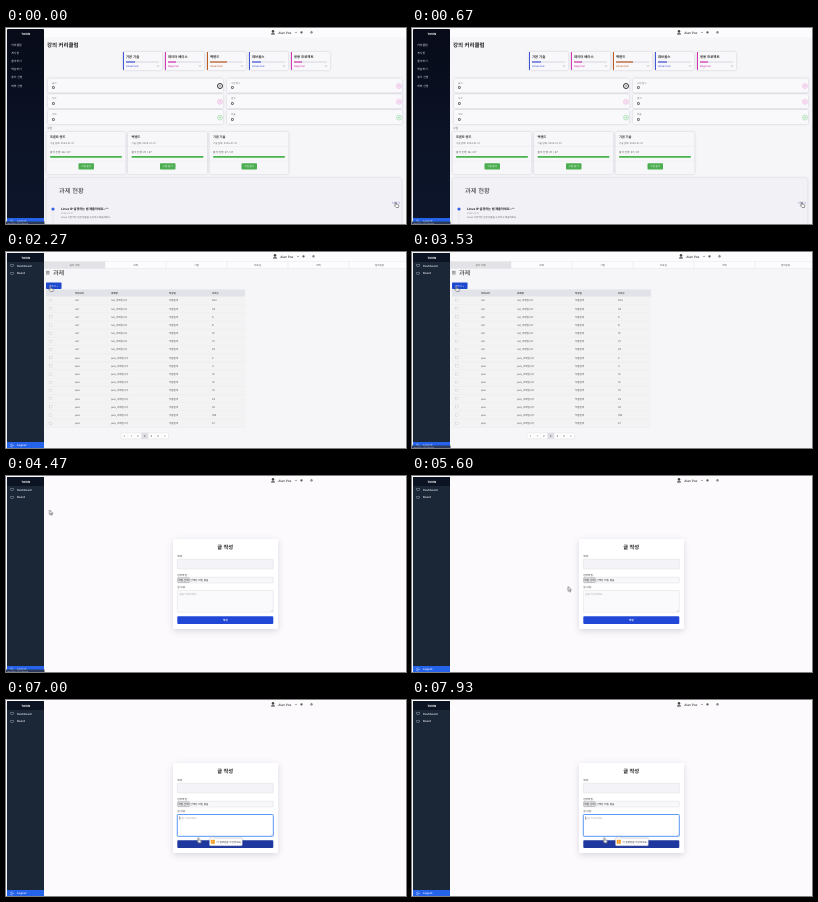
An HTML page for the animation above (8 s loop, 400 px wide and 196 px high).

```html
<!DOCTYPE html>
<html lang="ko">
<head>
<meta charset="utf-8">
<title>Course dashboard</title>
<style>
html, body { margin: 0; width: 100%; height: 100%; overflow: hidden; background: #fbfafc; }
svg { display: block; width: 100vw; height: 100vh; }
text { font-family: Inter, "Noto Sans CJK KR", "Noto Sans CJK", sans-serif; text-rendering: geometricPrecision; }
.card { filter: drop-shadow(0 .5px .8px rgba(30, 30, 60, .2)); }
.form { filter: drop-shadow(0 2px 3px rgba(40, 40, 80, .16)); }

.cut { animation: 8s step-end infinite; }
#home { animation-name: home; }
#board { animation-name: board; }
#write { animation-name: write; }
#dark { animation-name: home; }
#slate { animation-name: slate; }
@keyframes home { 0% { opacity: 1 } 11.625%, 100% { opacity: 0 } }
@keyframes slate { 0% { opacity: 0 } 11.625%, 100% { opacity: 1 } }
@keyframes board { 0% { opacity: 0 } 11.625% { opacity: 1 } 55%, 100% { opacity: 0 } }
@keyframes write { 0% { opacity: 0 } 55%, 100% { opacity: 1 } }

#status { animation: status 8s linear infinite; }
@keyframes status {
  0%, 11.6% { opacity: 1 } 11.625%, 33.3% { opacity: 0 }
  33.375%, 59.1% { opacity: 1 } 62.5%, 100% { opacity: 0 }
}
#add { animation: add 8s linear infinite; }
@keyframes add { 0%, 26.5% { fill: #2563eb } 27.5%, 100% { fill: #1d49cf } }
#send { animation: send 8s linear infinite; }
@keyframes send { 0%, 75.8% { fill: #2047d6 } 77.5%, 81.6% { fill: #1d41cc } 83%, 100% { fill: #1f389f } }
#focus { animation-name: focus; }
@keyframes focus { 0% { opacity: 0 } 81.625%, 100% { opacity: 1 } }
#caret { animation-name: caret; }
@keyframes caret {
  0% { opacity: 0 } 81.625% { opacity: 1 } 87.875% { opacity: 0 } 94.125%, 100% { opacity: 1 }
}
#tip { animation: tip 8s linear infinite; }
@keyframes tip { 0%, 81.625% { opacity: 0 } 83.5%, 100% { opacity: 1 } }

#pointer { animation: move 8s ease-in-out infinite; }
@keyframes move {
  0%, 10.9% { transform: translate(389px, 174px) }
  14%, 17% { transform: translate(271px, 151px) }
  21.6% { transform: translate(158px, 88px) }
  27.5%, 65.875% { transform: translate(43.5px, 34px) }
  71.625%, 75% { transform: translate(178px, 125.5px) }
  77.5%, 81.6% { transform: translate(191.5px, 139.5px) }
  83%, 100% { transform: translate(191.5px, 137.5px) }
}
#arrow { animation-name: arrow; }
#hand { animation-name: hand; }
@keyframes arrow {
  0% { opacity: 0 } 11.625% { opacity: 1 } 27.5% { opacity: 0 } 55% { opacity: 1 } 81.625%, 100% { opacity: 0 }
}
@keyframes hand {
  0% { opacity: 1 } 11.625% { opacity: 0 } 27.5% { opacity: 1 } 55% { opacity: 0 } 81.625%, 100% { opacity: 1 }
}
</style>
</head>
<body>
<svg id="stage" viewBox="0 0 400 196" preserveAspectRatio="none"></svg>
<script>
const rect = (x, y, w, h, fill, more = '') =>
  `<rect x="${x}" y="${y}" width="${w}" height="${h}" fill="${fill}" ${more}/>`;
// y is the vertical middle of the line
const text = (x, y, size, str, fill = '#333', more = '') =>
  `<text x="${x}" y="${y + size * .36}" font-size="${size}" fill="${fill}" ${more}>${str}</text>`;
const path = (d, stroke, width = .5, fill = 'none') =>
  `<path d="${d}" stroke="${stroke}" stroke-width="${width}" fill="${fill}"/>`;
const dot = (x, y, r, fill, more = '') => `<circle cx="${x}" cy="${y}" r="${r}" fill="${fill}" ${more}/>`;
const group = (id, body, cls = 'cut') => `<g id="${id}" class="${cls}">${body}</g>`;
const each = (list, fn) => list.map(fn).join('');
const bold = 'font-weight="700"', semi = 'font-weight="500"', mid = 'text-anchor="middle"';

function header(dx) {
  const x = 267 + dx;
  return dot(x, 3.2, 1.2, '#444') + path(`M${x - 1.7} 6.6q0-2 1.7-2t1.7 2z`, '#555', .3, '#777')
    + text(x + 5.3, 4.4, 3.1, 'Alan Poe', '#333', semi)
    + path(`M${x + 22} 3.9l1 1l1-1`, '#444')
    + dot(x + 28.5, 4.4, 1.1, '#555') + dot(x + 38.5, 4.4, 1.1, '#555') + dot(x + 38.5, 4.4, .4, '#fff');
}

function sidebar() {
  const brand = text(19.7, 5.8, 2.9, 'TOVIN', '#fff', bold + mid.padStart(22));
  const menu = ['커리큘럼', '게시판', '출석하기', '학습하기', '휴가 신청', '외박 신청'];
  const dark = rect(1, 1, 37, 195, 'url(#night)', 'rx="1"') + brand
    + each(menu, (s, i) => text(5.3, 16.5 + 8.2 * i, 2.8, s, '#e8eaf0', semi));
  const slate = rect(1, 1, 37, 195, '#1b2637', 'rx="1"') + rect(1, 1, 37, 9, '#0c1322') + brand
    + each(['Dashboard', 'Board'], (s, i) => rect(4.8, 12.5 + 7.7 * i, 2.4, 2, 'none', 'stroke="#aab4c4" stroke-width=".4"')
      + text(11, 13.6 + 7.7 * i, 2.8, s, '#eef1f6', semi));
  return group('dark', dark) + group('slate', slate)
    + rect(1, 190, 37, 6, '#2563eb') + path('M6.5 192h-1.6v3h1.6M6 193.5h2', '#fff', .4)
    + text(11, 193.4, 2.8, 'Logout', '#fff', semi)
    + group('status', rect(0, 193.5, 38.5, 2.5, '#2c3a5c') + text(1.5, 194.9, 2, 'localhost:3000/board', '#9fadca'), '');
}

function home() {
  const blue = '#4058d6', pink = '#d436b4', rust = '#bd5c22';
  const skills = [['기본 기술', blue, 9], ['데이터 베이스', pink, 8], ['백엔드', rust, 17], ['데브옵스', blue, 9], ['응용 프로젝트', pink, 8]];
  const levels = { [blue]: 'Advanced', [pink]: 'Beginner', [rust]: 'Advanced' };
  const stats = [['출석', '수업 일수'], ['지각', '결석'], ['조퇴', '외출']];
  const courses = [['프론트 엔드', '26 / 27'], ['백엔드', '27 / 27'], ['기본 기술', '27 / 27']];

  const skill = ([name, tone, w], i) => {
    const x = 117 + 42 * i;
    return `<g class="card">${rect(x, 24, 39, 18, '#f8f7fa', 'rx="1"')}</g>` + rect(x, 24, 1, 18, tone)
      + text(x + 3, 28.3, 3.4, name, '#333', bold)
      + rect(x + 3, 33.4, 33, 1.2, '#dfdee5') + rect(x + 3, 33.4, w, 1.2, tone)
      + text(x + 3, 38, 2.6, levels[tone], tone) + path(`M${x + 34} 37.5l1 1l1-1`, '#555', .4);
  };
  const stat = (name, x, y, ring, fill) =>
    `<g class="card">${rect(x, y, 175, 14, '#f9f8fb', 'rx="1"')}</g>`
    + text(x + 4, y + 4.3, 2.4, name, '#777') + text(x + 4, y + 9.3, 4.2, '0', '#222', bold)
    + dot(x + 172, y + 7.5, 2.5, fill, `stroke="${ring}" stroke-width="${ring === '#333' ? 1 : .4}"`)
    + path(`M${x + 171} ${y + 7.5}h2`, ring, .6);
  const course = ([name, done], i) => {
    const x = 40.5 + 81.5 * i;
    return `<g class="card">${rect(x, 104, 79, 42, '#f7f6f8', 'rx="1"')}</g>`
      + text(x + 3.5, 108.8, 3.2, name, '#333', bold)
      + text(x + 3.5, 114.7, 2.4, '기술 날짜: 2024-01-01', '#666')
      + path(`M${x} 118.5h79M${x} 133h79`, '#e4e3e8', .4)
      + text(x + 3.5, 123.8, 2.6, '출석 진행: ' + done, '#555')
      + rect(x + 3.5, 128, 72, 1.7, '#45b54c', 'rx=".8"')
      + rect(x + 32, 135.3, 15.5, 6.2, '#4cae50', 'rx=".8"')
      + text(x + 39.7, 138.4, 2.5, '수업 듣기', '#fff', mid);
  };

  return rect(0, 0, 400, 196, '#f6f5f8') + rect(38, 0, 362, 9.5, '#fcfbfd') + header(0)
    + text(41, 17, 5.5, '강의 커리큘럼', '#222', bold)
    + each(skills, skill)
    + each(stats, ([a, b], i) => {
      const y = 50.5 + 15.8 * i, tone = i === 2 ? ['#79c98b', '#e6f5e8'] : ['#e29ad4', '#f9e7f5'];
      return stat(a, 42, y, ...(i ? tone : ['#333', '#f6f6f6'])) + stat(b, 221, y, ...tone);
    })
    + text(41, 100, 2.8, '수업', '#666')
    + each(courses, course)
    + `<g class="card">${rect(40.5, 150, 355, 50, '#f2f1f6', 'rx="2"')}</g>`
    + text(53, 163, 6.3, '과제 현황', '#333', semi)
    + text(386, 175, 2.8, '더보기', '#6a62c8')
    + path('M47 181V196', '#d5d7e4', .4) + dot(47, 181, 1.6, '#3a5fe0')
    + text(55, 181, 3.1, 'Linux IP 설정하는 법 제출하세요~^^', '#222', bold)
    + text(55, 185.3, 2.2, '2024-01-17', '#888')
    + text(55, 189.6, 2.4, 'Linux 기본적인 설정 법들을 숙지하고 제출하세요.', '#666');
}

function board() {
  const tabs = ['공지 사항', '과제', '시험', '자료실', '회의', '질의응답'];
  const views = [554, 33, 5, 8, 12, 31, 22, 2, 4, 13, 13, 37, 23, 30, 198, 57];
  const row = (n, i) => {
    const y = 48.5 + 8.18 * i, kind = i < 7 ? 'net' : 'java';
    return rect(43.8, y - 1.1, 2.2, 2.2, '#fafafa', 'stroke="#bbb" stroke-width=".3"')
      + text(69, y, 2.5, kind, '#555') + text(105, y, 2.5, kind + '_과제입니다', '#555')
      + text(163, y, 2.5, '작품입력', '#555') + text(206, y, 2.5, n, '#555')
      + path(`M40 ${y + 4.1}h199`, '#e6e5e8', .3);
  };
  return rect(0, 0, 400, 196, '#f6f5f7') + rect(38, 0, 362, 16.5, '#fcfbfd') + header(2)
    + rect(38, 9.5, 61, 7, '#e3e2e6')
    + path('M38 9.5H400M38 16.5H400', '#e1e0e5', .4)
    + each(tabs, (s, i) => text(68.5 + 61 * i, 13, 2.5, s, '#555', mid) + path(`M${99 + 61 * i} 9.5v7`, '#e1e0e5', .4))
    + path('M40 19.4h3.6M40 20.7h3.6M40 22h3.6', '#333', .5)
    + text(47, 20.7, 6.1, '과제', '#222', semi)
    + `<rect id="add" x="40" y="30.5" width="15.5" height="6.5" rx=".7"/>`
    + text(47.7, 33.8, 2.5, '글쓰기 +', '#fff', mid)
    + rect(40, 37.5, 199, 138.5, '#f3f3f4') + rect(40, 37.5, 199, 7, '#e2e3e8')
    + each([[69, '카테고리'], [105, '과제명'], [163, '작성일'], [206, '조회수']], ([x, s]) => text(x, 41, 2.4, s, '#444', bold))
    + each(views, row)
    + rect(115, 180.8, 47.5, 6, '#fff', 'rx=".7" stroke="#d9d9de" stroke-width=".4"')
    + rect(135.4, 180.8, 6.8, 6, '#dedfe5')
    + each([...'«12345»'], (s, i) => text(118.4 + 6.75 * i, 183.8, 2.8, s, '#555', mid)
      + (i ? path(`M${115 + 6.8 * i} 180.8v6`, '#e0e0e4', .3) : ''));
}

function write() {
  const line = 'stroke="#d4d5dc" stroke-width=".4" rx=".8"';
  return rect(0, 0, 400, 196, '#fcfafc') + header(0)
    + `<g class="form">${rect(167, 63, 105, 90, '#fff', 'rx="1.6"')}</g>`
    + text(219.3, 71, 5.3, '글 작성', '#222', bold + ' ' + mid)
    + each([[80.3, '제목:'], [98.8, '첨부파일:'], [111.3, '글 내용:']], ([y, s]) => text(171.3, y, 2.6, s, '#444', semi))
    + rect(171.3, 83.2, 96, 9.8, '#f4f4f8', line)
    + rect(171.3, 101.2, 96, 5.8, '#f8f8fb', line)
    + rect(171.8, 101.8, 11.5, 4.6, '#e6e6eb', 'stroke="#777" stroke-width=".4" rx=".5"')
    + text(177.5, 104.1, 2.5, '파일 선택', '#222', mid)
    + text(184.3, 104.1, 2.6, '선택된 파일 없음', '#333')
    + rect(171.3, 114.5, 96, 21.8, '#fafafc', line)
    + group('focus', rect(171.3, 114.5, 96, 21.8, '#fff', 'stroke="#4c8ff5" stroke-width=".9" rx=".8"'))
    + text(173.3, 118, 2.5, '글을 작성하세요...', '#a2a4ae')
    + group('caret', rect(173, 116.4, .4, 3.2, '#333'))
    + path('M265 135.6l1.6-1.6M266 135.6l.6-.6', '#888', .3)
    + `<rect id="send" x="171.3" y="140.2" width="96" height="7.8" rx=".9"/>`
    + text(219.3, 144.1, 2.6, '작성', '#fff', bold + ' ' + mid)
    + group('tip', `<g class="card">${path('M204.5 138.2h.6l1.6-1.6l1.6 1.6h27q1 0 1 1v5.6q0 1-1 1h-30.8q-1 0-1-1v-5.6q0-1 1-1z', '#b9b9c0', .3, '#fff')}</g>`
      + rect(204.8, 139.7, 4, 4, '#f29a1f', 'rx=".5"') + text(206.8, 141.7, 3.2, '!', '#fff', bold + ' ' + mid)
      + text(210.4, 141.8, 2.5, '이 입력란을 작성하세요.', '#333'), '');
}

const pointer = group('pointer',
  group('arrow', path('M0 0v4.6l1.1-1l.8 1.8l.8-.4l-.8-1.7h1.5z', '#222', .45, '#fff'))
  + group('hand', path('M.3 .5q.5-.6 1 0v1.8l2 .5q.6.2.5.9l-.4 1.8h-2.3l-1.7-2q.2-.7.9-.1z', '#222', .45, '#fff')), '');

document.getElementById('stage').innerHTML =
  `<defs><linearGradient id="night" x2="0" y2="1"><stop stop-color="#070b18"/><stop offset=".5" stop-color="#0b1225"/><stop offset="1" stop-color="#0d162b"/></linearGradient></defs>`
  + group('home', home()) + group('board', board()) + group('write', write()) + sidebar() + pointer;
</script>
</body>
</html>
```
